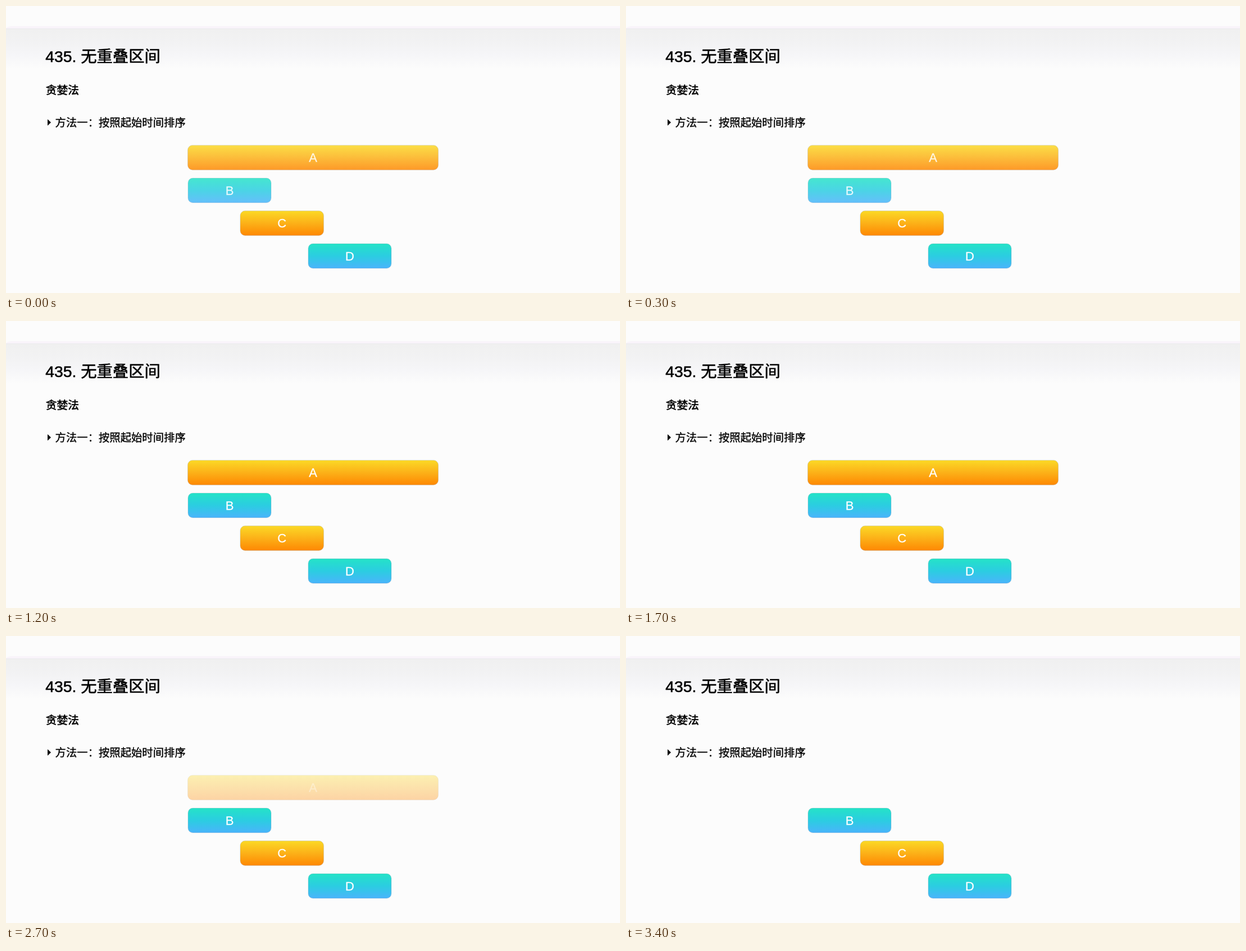
Animation, 1093 px wide and 512 px high, one loop 3500 ms. Source, as an HTML page with a canvas:

```html
<!DOCTYPE html>
<html lang="zh-CN">
<head>
<meta charset="utf-8">
<title>435. 无重叠区间</title>
<style>
html, body { margin: 0; width: 100%; height: 100%; overflow: hidden; background: #fcfcfc; }
canvas { display: block; width: 1093px; height: 512px; }
</style>
</head>
<body>
<canvas id="stage" width="1093" height="512"></canvas>
<script>
const ctx = document.getElementById('stage').getContext('2d');
const LOOP = 3500, STEP = 100;
const FONT = '"Liberation Sans", "Noto Sans CJK SC", "Noto Sans CJK", sans-serif';
const GOLD = ['#fbd926', '#fcb118', '#fe8802'];
const TEAL = ['#24e3c7', '#2bcde1', '#4ab4fb'];

const bars = [
  { name: 'A', x: 323.5, y: 248.4, w: 446, colors: GOLD },
  { name: 'B', x: 324, y: 307, w: 148, colors: TEAL },
  { name: 'C', x: 417, y: 365.4, w: 148.5, colors: GOLD },
  { name: 'D', x: 538, y: 424, w: 148, colors: TEAL }
];
const BAR_H = 44, RADIUS = 8.5;

function gradient(y0, y1, colors) {
  const g = ctx.createLinearGradient(0, y0, 0, y1);
  colors.forEach((c, i) => g.addColorStop(i / (colors.length - 1), c));
  return g;
}

// Regular weight thickened by a fine outline, for a medium look.
function text(str, x, y, size, color, weight, align = 'left') {
  ctx.font = `${size}px ${FONT}`;
  ctx.textAlign = align;
  ctx.fillStyle = ctx.strokeStyle = color;
  ctx.lineWidth = weight;
  ctx.lineJoin = 'round';
  ctx.fillText(str, x, y);
  ctx.strokeText(str, x, y);
}

function drawBackground() {
  ctx.fillStyle = '#fcfcfc';
  ctx.fillRect(0, 0, 1093, 512);
  ctx.fillStyle = '#f9f4fa';
  ctx.beginPath();
  ctx.moveTo(0, 40);
  ctx.quadraticCurveTo(2, 36, 12, 36);
  ctx.lineTo(1093, 36);
  ctx.lineTo(1093, 40);
  ctx.fill();
  ctx.fillStyle = gradient(40, 112, ['#f0f0f0', '#f2f2f3', '#f6f6f8', '#fcfcfc']);
  ctx.fillRect(0, 40, 1093, 72);
  ctx.fillStyle = '#ebeaee';
  ctx.fillRect(0, 40, 1093, 1);
}

function drawHeadings() {
  text('435. 无重叠区间', 70.3, 100.3, 28.3, '#000', 0.6);
  text('贪婪法', 70.7, 157.4, 19.8, '#000', 0.6);
  text('方法一：按照起始时间排序', 87.6, 214.6, 19.35, '#000', 0.35);
  ctx.fillStyle = '#000';
  ctx.beginPath();
  ctx.moveTo(74, 202);
  ctx.lineTo(80, 207.7);
  ctx.lineTo(74, 213.4);
  ctx.fill();
}

function drawBar({ name, x, y, w, colors }, alpha) {
  if (alpha <= 0) return;
  ctx.globalAlpha = alpha;
  ctx.beginPath();
  ctx.roundRect(x, y, w, BAR_H, RADIUS);
  ctx.fillStyle = gradient(y, y + BAR_H, colors);
  ctx.fill();
  ctx.strokeStyle = 'rgba(150, 160, 175, 0.4)';
  ctx.lineWidth = 0.8;
  ctx.stroke();
  text(name, x + w / 2, y + 30, 22, '#fff', 0.3, 'center');
  ctx.globalAlpha = 1;
}

// Soft dip in opacity around 150 ms.
function blink(t) {
  const d = Math.min(Math.abs(t - 150) / 500, 1);
  return 1 - 0.19 * Math.cos(d * Math.PI / 2) ** 2;
}

function fadeOut(t) {
  const p = Math.min(Math.max((t - 2400) / 500, 0), 1);
  return 1 - p * p * (3 - 2 * p);
}

function frame() {
  const t = Math.floor(performance.now() % LOOP / STEP) * STEP;
  const alpha = { A: blink(t) * fadeOut(t), B: blink(t), C: 1, D: 1 };
  drawBackground();
  drawHeadings();
  bars.forEach(bar => drawBar(bar, alpha[bar.name]));
  requestAnimationFrame(frame);
}
frame();
</script>
</body>
</html>
```
